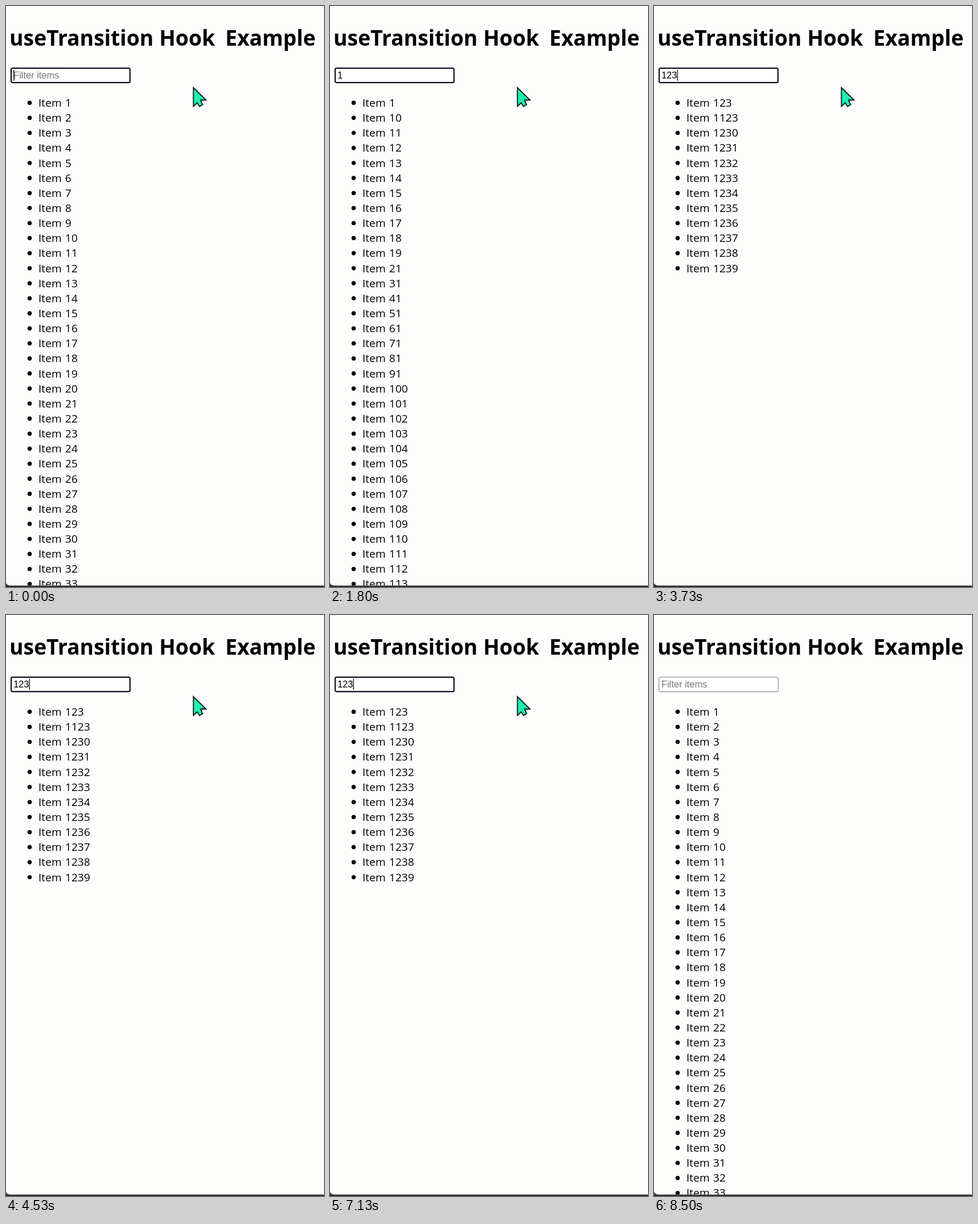
Write an HTML page that moves like this. It is 554 by 1010 pixels and loops after 8.53 s.

```html
<!DOCTYPE html>
<html lang="en">
<head>
<meta charset="utf-8">
<title>useTransition Hook Example</title>
<style>
  html, body { margin: 0; width: 100%; height: 100%; overflow: hidden; background: #fdfdfc; }
  svg { display: block; width: 554px; height: 1010px; }
  .heading { font: 700 37px "Open Sans", "Noto Sans", sans-serif; }
  .list { font: 400 19px "Open Sans", "Noto Sans", sans-serif; word-spacing: 1.3px; }
  .field { font: 16.3px "Liberation Sans", Arial, sans-serif; }
</style>
</head>
<body>
<svg viewBox="0 0 554 1010">
  <defs>
    <clipPath id="page"><path d="M0 0H554V1007.5H8Q2 1007.5 0 1003Z"/></clipPath>
  </defs>
  <rect width="554" height="1010" fill="#303033"/>
  <g clip-path="url(#page)">
    <rect width="554" height="1010" fill="#fdfdfc"/>
    <g class="heading">
      <text x="6" y="69">useTransition</text>
      <text x="267" y="69">Hook</text>
      <text x="382" y="69">Example</text>
    </g>
    <rect id="focused" x="9" y="108.2" width="207" height="25" rx="2.5" fill="#fff" stroke="#101020" stroke-width="2.2"/>
    <rect id="blurred" x="8.5" y="108" width="208" height="25.5" rx="2.5" fill="#fff" stroke="#77777f"/>
    <text id="value" class="field" x="13" y="126"></text>
    <rect id="caret" y="111" width="1.3" height="19"/>
    <g id="list" class="list"></g>
  </g>
  <path id="pointer" d="M326.5 142V174.5L333 168.5L337 174.5L342.5 171.5L339 163.5H348.5Z"
        fill="#1cf0b4" stroke="#0a1512" stroke-width="1.8"/>
</svg>
<script>
  const LOOP = 8530, BLINK = 530, ROWS = 33, ROW_HEIGHT = 26.14, DIGIT = 9.07;
  const RELOAD = 7880;
  const $ = id => document.getElementById(id);

  // Each step: start time, then its value
  const typed = [[0, ''], [250, '1'], [3230, '12'], [3435, '123'], [RELOAD, '']];
  const filters = [[0, ''], [480, '1'], [3520, '123'], [RELOAD, '']];
  const blinkStarts = [[0, 0], [60, 60], [3230, 3230], [3435, 3435]];
  const stepAt = (steps, t) => steps.filter(([start]) => start <= t).pop()[1];

  const items = Array.from({ length: 2000 }, (_, i) => String(i + 1));
  let shownFilter = null;

  function showList(filter) {
    if (filter === shownFilter) return;
    shownFilter = filter;
    $('list').innerHTML = items
      .filter(item => item.includes(filter))
      .slice(0, ROWS)
      .map((item, i) => {
        const y = 168.3 + i * ROW_HEIGHT;
        return `<circle cx="41.2" cy="${y}" r="3.7"/><text x="56.5" y="${y + 6.7}">Item ${item}</text>`;
      })
      .join('');
  }

  function show(element, visible) {
    element.style.display = visible ? '' : 'none';
  }

  function movePointer(t) {
    const p = Math.min(1, Math.max(0, (t - 7350) / 400));
    const eased = p * p * (3 - 2 * p);
    $('pointer').setAttribute('transform', `translate(${130 * eased} ${-190 * eased})`);
    show($('pointer'), p < 1);
  }

  function render(t) {
    const text = stepAt(typed, t);
    const focused = t < RELOAD;
    const caretOn = (t - stepAt(blinkStarts, t)) % (2 * BLINK) < BLINK;

    $('value').textContent = text || 'Filter items';
    $('value').setAttribute('fill', text ? '#000' : '#757575');
    $('caret').setAttribute('x', 13 + text.length * DIGIT);
    show($('caret'), focused && caretOn);
    show($('focused'), focused);
    show($('blurred'), !focused);
    showList(stepAt(filters, t));
    movePointer(t);
  }

  const begin = performance.now();
  function frame() {
    render((performance.now() - begin) % LOOP);
    requestAnimationFrame(frame);
  }
  render(0);
  requestAnimationFrame(frame);
</script>
</body>
</html>
```
